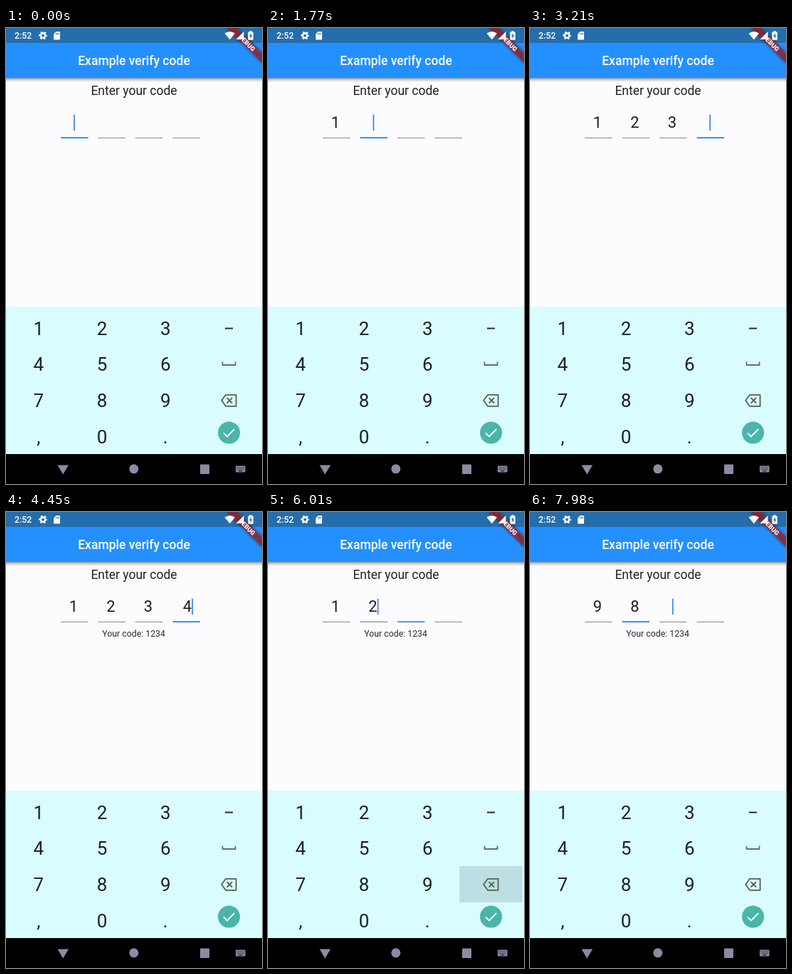
Animation, 360 px wide and 640 px high, one loop 8000 ms. Source, as an HTML page:

```html
<!DOCTYPE html>
<html lang="en">
<head>
<meta charset="utf-8">
<title>Verify code</title>
<style>
  html, body { margin: 0; width: 100%; height: 100%; overflow: hidden; background: #000; }
  svg { display: block; width: 100vw; height: 100vh; font-family: Roboto, sans-serif; }
  .mid { text-anchor: middle; }
  .key { font-size: 26px; fill: #1a2222; }
  .digit { font-size: 21.9px; fill: #1c1c1c; }
</style>
</head>
<body>
<svg viewBox="0 0 360 640" xmlns="http://www.w3.org/2000/svg">
  <defs>
    <linearGradient id="shade" x2="0" y2="1">
      <stop offset="0" stop-color="#000" stop-opacity=".42"/>
      <stop offset=".5" stop-color="#000" stop-opacity=".16"/>
      <stop offset="1" stop-color="#000" stop-opacity="0"/>
    </linearGradient>
    <filter id="glow" x="-20%" y="-80%" width="140%" height="260%">
      <feGaussianBlur stdDeviation="2"/>
    </filter>
  </defs>

  <rect width="360" height="640" fill="#fcfcfe"/>
  <rect y="70" width="360" height="6" fill="url(#shade)"/>
  <rect width="360" height="70" fill="#2490ff"/>
  <rect width="360" height="21" fill="#266dab"/>
  <text class="mid" x="180" y="52" font-size="17.5" font-weight="500" fill="#fff">Example verify code</text>
  <text class="mid" x="180" y="94" font-size="17.5" fill="#222">Enter your code</text>
  <g id="cells"></g>
  <rect id="cursor" y="121.5" width="1.8" height="22.5" fill="#4285f4"/>
  <text id="result" class="mid" x="179.6" y="175" font-size="12.3" fill="#2a2a2a">Your code: 1234</text>

  <!-- corner banner -->
  <g transform="translate(360 0) rotate(45)">
    <rect x="-35" y="24.5" width="70" height="10.5" fill="#000" opacity=".4" filter="url(#glow)"/>
    <rect x="-35" y="24.5" width="70" height="10.5" fill="#b71c1c" opacity=".63"/>
    <text class="mid" y="33" font-size="8.9" font-weight="900" fill="#fff">DEBUG</text>
  </g>

  <!-- status bar -->
  <g fill="#fff">
    <text x="12" y="15.2" font-size="12.3" font-weight="500">2:52</text>
    <g transform="translate(52 10.6)">
      <circle r="3.2" fill="none" stroke="#fff" stroke-width="2.6"/>
      <circle r="5" fill="none" stroke="#fff" stroke-width="1.8" stroke-dasharray="2.6 2.636" stroke-dashoffset="1.3"/>
    </g>
    <path d="M70.5 5H75a1 1 0 0 1 1 1V15.5a1 1 0 0 1-1 1H68a1 1 0 0 1-1-1V8.5Z"/>
    <path d="M70.4 7v2.3M72.3 7v2.3M74.2 7v2.3" stroke="#266dab"/>
    <path d="M307.5 7.6Q315 2.4 322 7.6L314.8 16.2Z"/>
    <path d="M334.5 5V16H323.5Z"/>
    <path d="M342.4 4.2h3.4v1.3h1.2a.8.8 0 0 1 .8.8V16a.8.8 0 0 1-.8.8h-5.8a.8.8 0 0 1-.8-.8V6.300a.8.8 0 0 1 .8-.8h1.2Z"/>
    <path d="M344.8 7.200l-2.800 4.300h1.700v3.500l2.700-4.500h-1.600Z" fill="#266dab"/>
  </g>

  <!-- keyboard -->
  <rect y="391" width="360" height="207" fill="#d9fcff"/>
  <rect id="press" width="88.500" height="51" fill="#bddfe3"/>
  <g id="keys"></g>
  <rect x="308" y="420.600" width="11" height="2" fill="#2a2c28"/>
  <path d="M304.500 468.500V473H322.500V468.500" fill="none" stroke="#626a8c" stroke-width="1.800"/>
  <g fill="none" stroke="#56604e" stroke-width="1.800">
    <path d="M309 514.800H323.600V530.800H309L303.200 522.800Z" stroke-linejoin="round"/>
    <path d="M310.700 519.100l7.400 7.400m0-7.400l-7.400 7.400"/>
  </g>
  <circle cx="313.600" cy="568" r="15.500" fill="#4ab5aa"/>
  <path d="M306 568.400l5 5 10.200-10.400" fill="none" stroke="#fff" stroke-width="1.900"/>

  <!-- navigation bar -->
  <rect y="598" width="360" height="42" fill="#000"/>
  <g fill="#8c8ba4">
    <path d="M72.500 613.500H88L80.200 626.500Z"/>
    <circle cx="179.800" cy="618.800" r="6.500"/>
    <rect x="273" y="612.500" width="13" height="13.500" rx="1"/>
    <rect x="323" y="614.500" width="13.500" height="9" rx="1"/>
    <path d="M324.500 617H335M324.500 619.300H335" stroke="#000" stroke-dasharray="1.200 1"/>
    <path d="M327 621.700H332.500" stroke="#000"/>
  </g>
</svg>

<script>
const LOOP = 8000, FADE = 200;
const $ = id => document.getElementById(id);
const add = (parent, tag, attrs, text = '') => {
  const el = document.createElementNS('http://www.w3.org/2000/svg', tag);
  for (const k in attrs) el.setAttribute(k, attrs[k]);
  el.textContent = text;
  return parent.appendChild(el);
};
const set = (el, attrs) => { for (const k in attrs) el.setAttribute(k, attrs[k]); };
const show = (el, on) => el.setAttribute('visibility', on ? 'visible' : 'hidden');
const within = (t, [from, to]) => t >= from && t < to;

['123', '456', '789', ',0.'].forEach((row, r) =>
  [...row].forEach((ch, c) =>
    add($('keys'), 'text', { class: 'key mid', x: 45.8 + c * 89.2, y: 430.5 + r * 50.8 }, ch)));

// Digits held by each cell: from, to, character
const digits = [
  [[1460, 6910, '1'], [7500, LOOP, '9']],
  [[2200, 6420, '2'], [7940, LOOP, '8']],
  [[3010, 5970, '3']],
  [[3950, 4850, '4']]
];
// Focus changes: time, cell
const focus = [[0, 0], [1460, 1], [2200, 2], [3010, 3], [5440, 2],
  [5970, 1], [6420, 0], [7500, 1], [7980, 2]];
// Key presses: from, to, column, row
const presses = [
  [1360, 1480, 0, 0], [2100, 2230, 1, 0], [2880, 3030, 2, 0], [3620, 3790, 0, 1],
  [4730, 4940, 3, 2], [5890, 6020, 3, 2], [6380, 6500, 3, 2], [6870, 6950, 3, 2],
  [7430, 7540, 2, 2], [7600, 7690, 1, 2]
];
const cursorOff = [[500, 1000], [3710, 4450], [4850, 5350], [6910, 7410], [7940, 7980]];

const textX = [95, 147.5, 199.9, 255];
const cells = textX.map((x, i) => ({
  line: add($('cells'), 'rect', { x: 77 + i * 52.5, width: 38.5 }),
  text: add($('cells'), 'text', { class: 'digit mid', x, y: 140.3 })
}));

const GREY = [164, 162, 160], BLUE = [36, 144, 255];
const mix = (a, b, p) => a + (b - a) * p;

function draw(t) {
  const at = focus.findLastIndex(([start]) => t >= start);
  const [start, active] = focus[at];
  const previous = at ? focus[at - 1][1] : -1;
  const p = at ? Math.min(1, (t - start) / FADE) : 1;

  cells.forEach(({ line, text }, i) => {
    const lit = i === active ? p : i === previous ? 1 - p : 0;
    const h = mix(1.4, 1.9, lit);
    set(line, {
      y: 155 - h, height: h,
      fill: `rgb(${GREY.map((g, k) => Math.round(mix(g, BLUE[k], lit)))})`
    });
    const held = digits[i].find(d => within(t, d));
    text.textContent = held ? held[2] : '';
  });

  const filled = cells[active].text.textContent !== '';
  set($('cursor'), { x: filled ? textX[active] + 6.2 : 95.1 + active * 52.4 });
  show($('cursor'), !cursorOff.some(o => within(t, o)));
  show($('result'), t >= 3950);

  const press = presses.find(k => within(t, k));
  show($('press'), press);
  if (press) set($('press'), { x: 2 + press[2] * 89.1, y: 395 + press[3] * 51 });
}

const origin = performance.now();
function tick() {
  draw((performance.now() - origin) % LOOP);
  requestAnimationFrame(tick);
}
tick();
</script>
</body>
</html>
```
